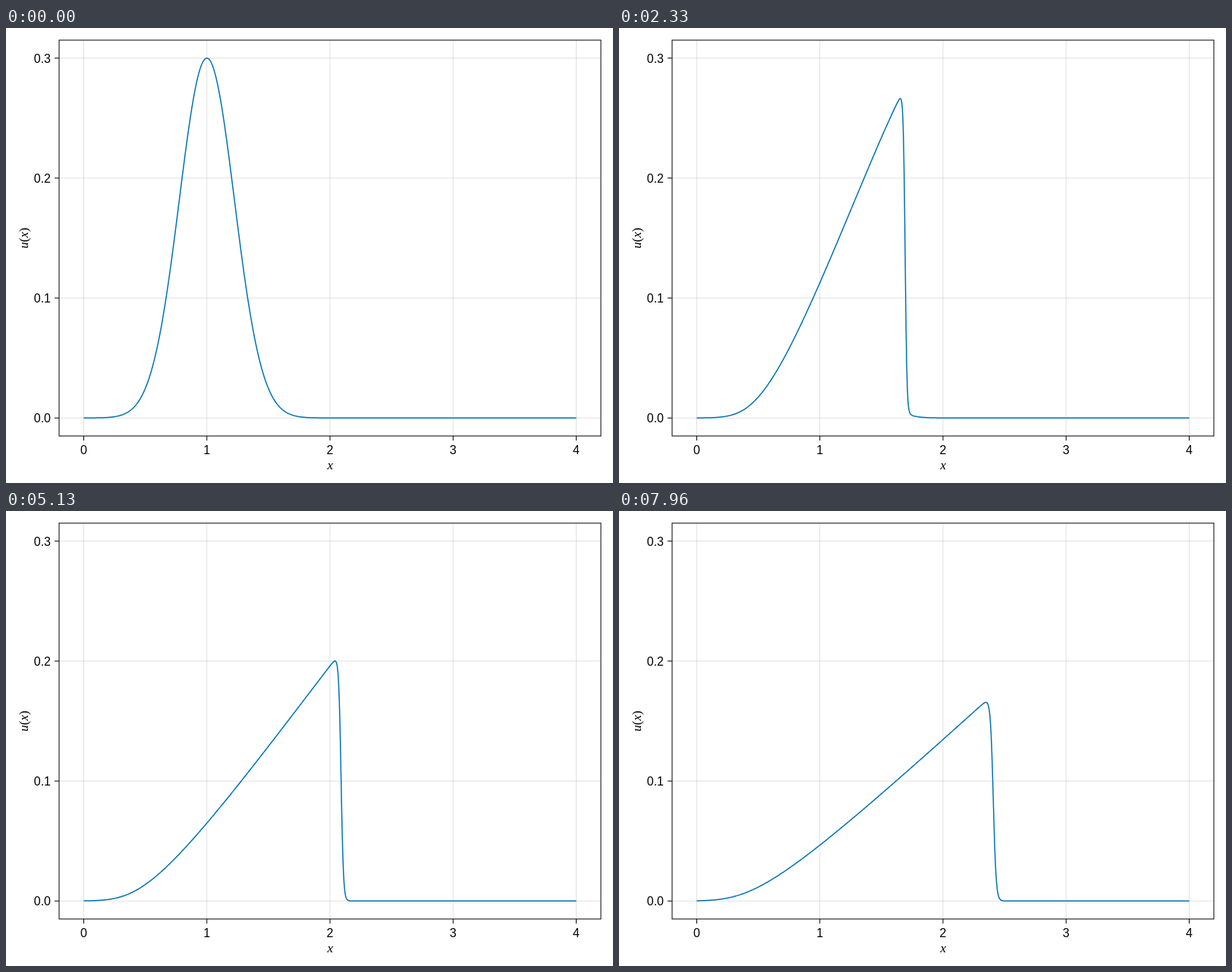
Animation, 800 px wide and 600 px high, one loop 8000 ms. Source, as an HTML page:

```html
<!DOCTYPE html>
<html lang="en">
<head>
<meta charset="utf-8">
<title>Steepening wave</title>
<style>
  html, body { margin: 0; width: 100%; height: 100%; overflow: hidden; background: #fff; }
  svg { display: block; width: 800px; height: 600px; }
  .grid { stroke: #000; stroke-opacity: .12; }
  .axis { stroke: #000; fill: none; }
  .tick { font: 16px "Liberation Sans", Arial, sans-serif; }
  .math { font: italic 17px "Liberation Serif", serif; text-anchor: middle; }
  .upright { font-style: normal; }
  #curve { fill: none; stroke: #0072b2; stroke-width: 1.5; stroke-linejoin: round; }
</style>
</head>
<body>
<svg viewBox="0 0 800 600">
  <g id="axes"></g>
  <path id="curve"/>
  <rect class="axis" x="70" y="16" width="714" height="522"/>
  <text class="math" x="427.3" y="582">x</text>
  <text class="math" transform="translate(29 277) rotate(-90)">u<tspan class="upright">(</tspan>x<tspan class="upright">)</tspan></text>
</svg>
<script>
const LOOP = 8000, FPS = 24, DT = 0.05, VISCOSITY = 0.001;
const AMPLITUDE = 0.3, SHARPNESS = 10;
const px = x => 70 + (x + 0.2) * 714 / 4.4;
const py = u => 538 - (u + 0.015) * 522 / 0.33;

function drawAxes() {
  let out = '';
  const line = (type, x1, y1, x2, y2) =>
    out += `<line class="${type}" x1="${x1}" y1="${y1}" x2="${x2}" y2="${y2}"/>`;
  const label = (x, y, anchor, text) =>
    out += `<text class="tick" x="${x}" y="${y}" text-anchor="${anchor}">${text}</text>`;
  for (let i = 0; i <= 4; i++) {
    const x = px(i);
    line('grid', x, 16, x, 538);
    line('axis', x, 538, x, 544);
    label(x, 562, 'middle', i);
  }
  for (let i = 0; i <= 3; i++) {
    const y = py(i / 10);
    line('grid', 70, y, 784, y);
    line('axis', 64, y, 70, y);
    label(59, y + 6, 'end', (i / 10).toFixed(1));
  }
  document.getElementById('axes').innerHTML = out;
}

// Initial bump and its running integral on a fine grid.
const H = 0.005, START = -4, COUNT = 2001;
const bump = x => AMPLITUDE * Math.exp(-SHARPNESS * (x - 1) ** 2);
const initial = new Float64Array(COUNT), potential = new Float64Array(COUNT);
for (let i = 0; i < COUNT; i++) {
  const y = START + i * H;
  initial[i] = bump(y);
  if (i) potential[i] = potential[i - 1] +
    H / 6 * (initial[i - 1] + 4 * bump(y - H / 2) + initial[i]);
}

// Cole-Hopf solution of the viscous Burgers equation.
function solve(x, t) {
  if (t === 0) return bump(x);
  const reach = 6 * Math.sqrt(2 * VISCOSITY * t);
  const step = 1 + Math.floor(t / 3);
  const first = Math.max(0, Math.floor((x - AMPLITUDE * t - reach - START) / H));
  const last = Math.min(COUNT - 1, Math.ceil((x + reach - START) / H));
  const action = i => potential[i] + (x - START - i * H) ** 2 / (2 * t);
  let least = Infinity, sum = 0, weight = 0;
  for (let i = first; i <= last; i += step) least = Math.min(least, action(i));
  for (let i = first; i <= last; i += step) {
    const w = Math.exp((least - action(i)) / (2 * VISCOSITY));
    weight += w;
    sum += w * initial[i];
  }
  return sum / weight;
}

const paths = [];
function pathAt(step) {
  if (!paths[step]) {
    const points = [];
    for (let i = 0; i <= 800; i++) {
      const x = i / 200;
      points.push(px(x).toFixed(2) + ' ' + py(solve(x, step * DT)).toFixed(2));
    }
    paths[step] = 'M' + points.join('L');
  }
  return paths[step];
}

const curve = document.getElementById('curve');
const begin = performance.now();
let shown = -1;
function render() {
  const time = Math.max(0, performance.now() - begin) % LOOP;
  // Step times are rounded to 10 ms, hence the small lead.
  const step = Math.min(191, Math.floor(time * FPS / 1000 + 0.13));
  if (step !== shown) curve.setAttribute('d', pathAt(shown = step));
  requestAnimationFrame(render);
}

drawAxes();
render();
</script>
</body>
</html>
```
